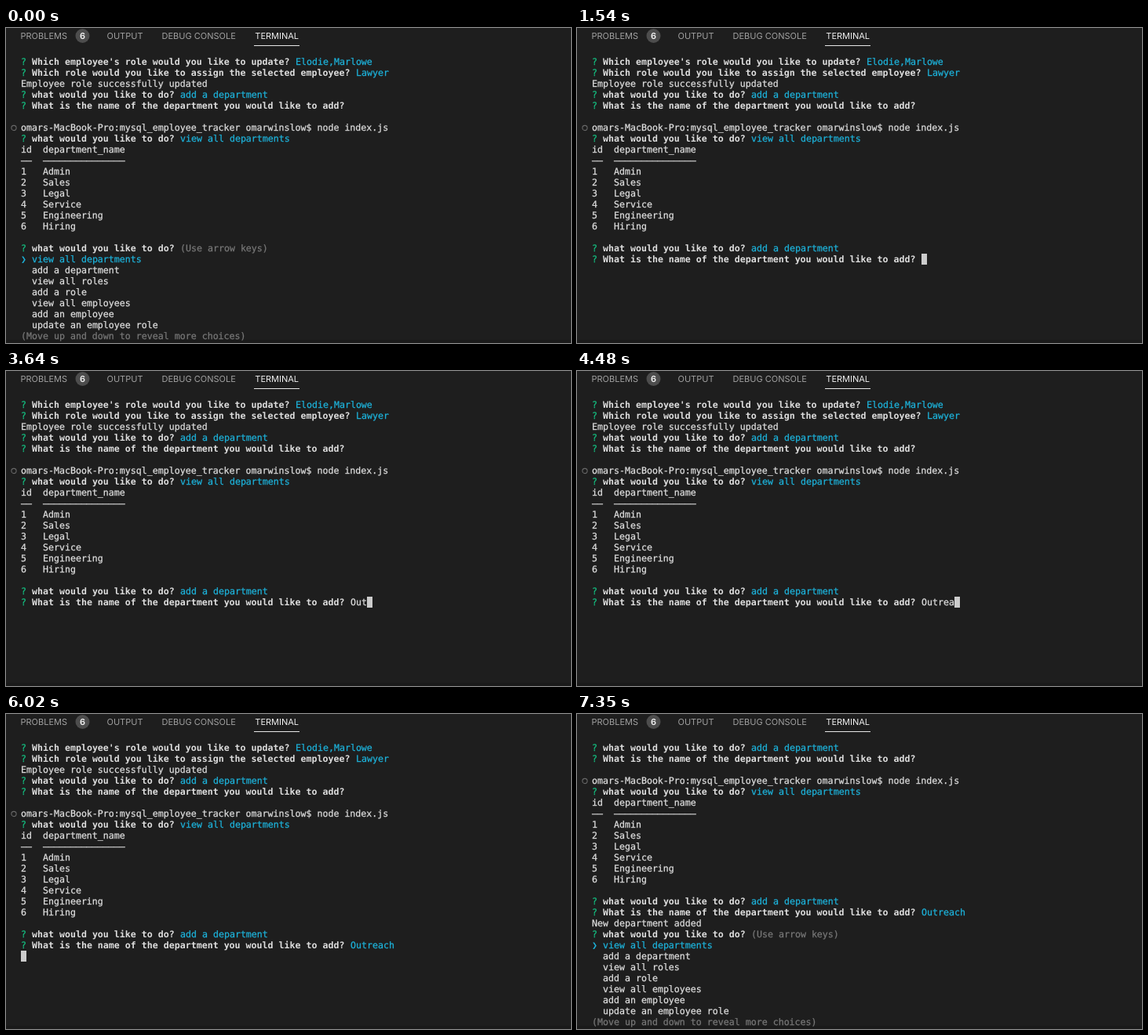
These frames come from a looping animation (720x402 px, 8000 ms). An HTML page:

```html
<!DOCTYPE html>
<html lang="en">
<head>
<meta charset="utf-8">
<title>Employee tracker terminal</title>
<style>
  html, body { margin: 0; width: 100%; height: 100%; overflow: hidden; background: #1e1e1e; }
  svg { display: block; width: 720px; height: 402px; }
  text { white-space: pre; text-rendering: geometricPrecision; }
  #tabs text { font: 11px Inter, "Open Sans", sans-serif; fill: #a0a0a0; }
  #tabs .on { fill: #f0f0f0; }
  #tabs .count { font-weight: 600; fill: #f4f4f4; text-anchor: middle; }
  #screen text {
    font: 11.628px "DejaVu Sans Mono", "Liberation Mono", monospace;
    color: #dedede; fill: currentColor; stroke: currentColor; stroke-width: .25px;
  }
  #screen .bold { font-weight: 700; stroke-width: 0; }
  #screen .green { color: #14bf80; }
  #screen .cyan { color: #1db2da; }
  #screen .dim { color: #777777; }
</style>
</head>
<body>
<svg viewBox="0 0 720 402">
  <rect width="720" height="402" fill="#1e1e1e"/>
  <rect y="398" width="720" height="4" fill="#1a1a1a"/>
  <g id="tabs">
    <text x="18.5" y="14">PROBLEMS</text>
    <circle cx="97.5" cy="10" r="9" fill="#4d4d4d"/>
    <text class="count" x="97.5" y="14">6</text>
    <text x="128.5" y="14">OUTPUT</text>
    <text x="198.5" y="14">DEBUG CONSOLE</text>
    <text class="on" x="317.3" y="14">TERMINAL</text>
    <rect x="316" y="22" width="58" height="1" fill="#e7e7e7"/>
  </g>
  <g id="screen"></g>
</svg>
<script>
const LOOP = 8000;
const LEFT = 19, CELL = 7, ROW = 14, BASE = 47;
const MOVE = 840, PICK = 1470, ENTER = 6020, DONE = 6090;
const WORD = "Outreach";
const KEYS = [2870, 3150, 3430, 4060, 4200, 4480, 4830, 5040];

const CHOICES = ["view all departments", "add a department", "view all roles", "add a role",
  "view all employees", "add an employee", "update an employee role"];
const DEPARTMENTS = ["Admin", "Sales", "Legal", "Service", "Engineering", "Hiring"];
const TODO = "what would you like to do?";
const NAME = "What is the name of the department you would like to add?";

// A line is a list of [text, class] parts.
const plain = text => [[text, ""]];
const ask = (question, answer = "", style = "cyan") =>
  [["? ", "green"], [question + " ", "bold"], [answer, style]];

const HISTORY = [
  ask("Which employee's role would you like to update?", "Elodie,Marlowe"),
  ask("Which role would you like to assign the selected employee?", "Lawyer"),
  plain("Employee role successfully updated"),
  ask(TODO, CHOICES[1]),
  ask(NAME),
  [],
  plain("omars-MacBook-Pro:mysql_employee_tracker omarwinslow$ node index.js"),
  ask(TODO, CHOICES[0]),
  plain("id  department_name"),
  plain("––  " + "–".repeat(15)),
  ...DEPARTMENTS.map((d, i) => plain(`${i + 1}   ${d}`)),
  []
];
const PROMPT_ROW = 6;

const menu = (index, hint = "") => [
  ask(TODO, hint, "dim"),
  ...CHOICES.map((c, i) => i === index
    ? [["❯ ", "cyan bold"], [c, "cyan"]]
    : [["  ", ""], [c, ""]]),
  [["(Move up and down to reveal more choices)", "dim"]]
];

function stateAt(t) {
  const hint = "(Use arrow keys)";
  if (t < MOVE) return { lines: [...HISTORY, ...menu(0, hint)], top: 0 };
  if (t < PICK) return { lines: [...HISTORY, ...menu(1)], top: 0 };

  const picked = [...HISTORY, ask(TODO, CHOICES[1])];
  if (t < ENTER) {
    const typed = WORD.slice(0, KEYS.filter(k => t >= k).length);
    return {
      lines: [...picked, ask(NAME, typed, "")], top: 0,
      cursor: [NAME.length + 3 + typed.length, picked.length]
    };
  }
  const answered = [...picked, ask(NAME, WORD)];
  if (t < DONE) return { lines: answered, top: 0, cursor: [0, answered.length] };
  return { lines: [...answered, plain("New department added"), ...menu(0, hint)], top: 3 };
}

const screen = document.getElementById("screen");

function add(tag, attrs, text = "") {
  const el = document.createElementNS("http://www.w3.org/2000/svg", tag);
  for (const key in attrs) el.setAttribute(key, attrs[key]);
  el.textContent = text;
  screen.append(el);
}

function draw({ lines, top, cursor }) {
  screen.replaceChildren();
  lines.slice(top).forEach((line, row) => {
    let col = 0;
    for (const [text, style] of line) {
      if (text.trim()) add("text", { x: LEFT + col * CELL, y: BASE + row * ROW, class: style }, text);
      col += text.length;
    }
  });
  add("circle", {
    cx: 10, cy: BASE - 3.5 + (PROMPT_ROW - top) * ROW, r: 3.1,
    fill: "none", stroke: "#686868", "stroke-width": 1.1
  });
  if (cursor) add("rect", {
    x: LEFT + cursor[0] * CELL, y: BASE - 11 + (cursor[1] - top) * ROW,
    width: CELL, height: ROW, fill: "#cccccc"
  });
}

const STEPS = [0, MOVE, PICK, ...KEYS, ENTER, DONE];
const start = performance.now();
let shown = -1;

function tick() {
  const t = Math.max(0, performance.now() - start) % LOOP;
  const step = STEPS.filter(s => t >= s).length;
  if (step !== shown) {
    shown = step;
    draw(stateAt(t));
  }
  requestAnimationFrame(tick);
}
tick();
</script>
</body>
</html>
```
